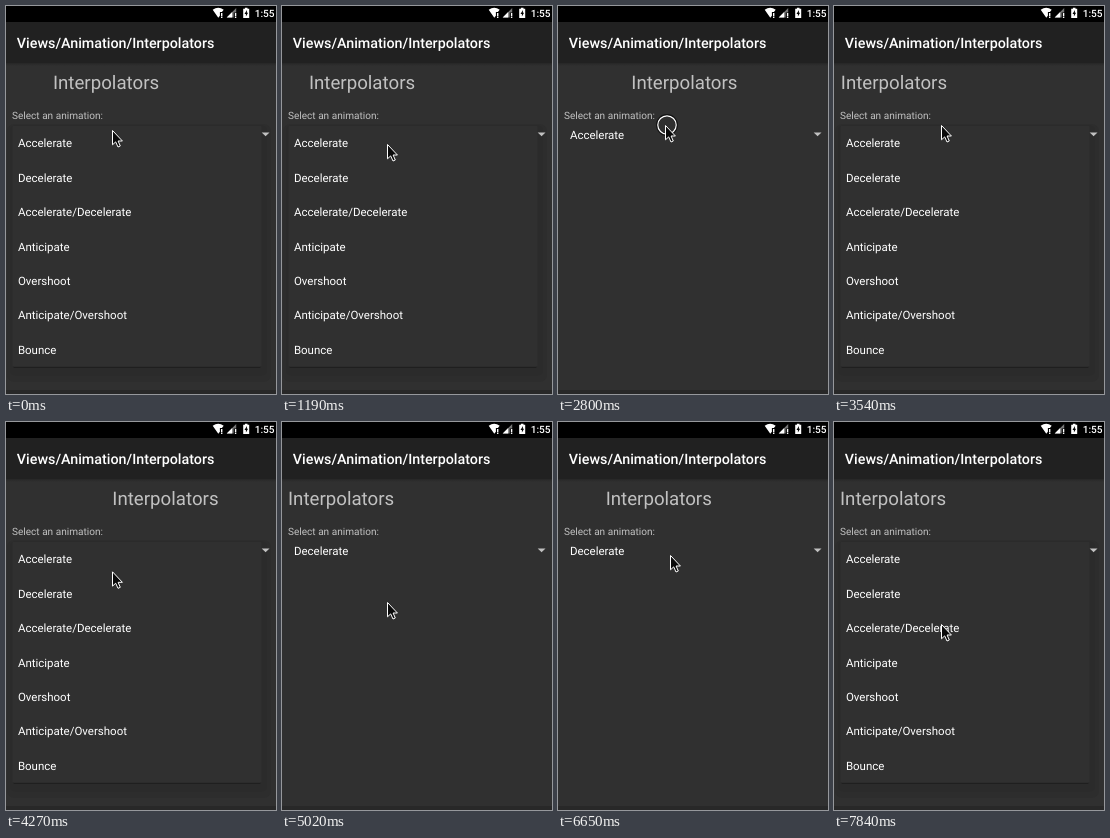
An HTML page for the animation above (7.99 s loop, 270 by 388 pixels).

```html
<!DOCTYPE html>
<html lang="en">
<head>
<meta charset="utf-8">
<title>Interpolators</title>
<style>
  html, body { margin: 0; width: 100%; height: 100%; overflow: hidden; background: #303030; }
  svg { display: block; width: 100%; height: 100%; }
  text { font-family: Roboto, "Noto Sans", sans-serif; fill: #fff; text-rendering: geometricPrecision; }
  .row { font-size: 11.5px; }
  .soft { fill: #c1c1c1; }
</style>
</head>
<body>
<svg viewBox="0 0 270 388">
  <defs>
    <linearGradient id="drop" x1="0" y1="0" x2="0" y2="1">
      <stop offset="0" stop-color="#000" stop-opacity=".2"/>
      <stop offset="1" stop-color="#000" stop-opacity="0"/>
    </linearGradient>
  </defs>

  <rect width="270" height="388" fill="#303030"/>
  <rect y="384" width="270" height="4" fill="#282828"/>
  <rect y="57" width="270" height="3" fill="url(#drop)"/>
  <rect y="15" width="270" height="42" fill="#212121"/>
  <rect width="270" height="16" fill="#000"/>

  <!-- status icons -->
  <g fill="#fff" transform="translate(-.3 -.5)">
    <path d="M207 4.2Q212.5 .2 218 4.2L216.2 6.6H214.2V10.2L212.6 12.2Z"/>
    <path d="M215.3 7.4h1.4v3h-1.4zM215.3 11h1.4v1.4h-1.4z"/>
    <path d="M230.5 2.5V7H228V12H221Z" fill="#777"/>
    <path d="M226.5 6.5V12H221Z"/>
    <path d="M229.2 7.6h1.4v2.8h-1.4zM229.2 11h1.4v1.4h-1.4z"/>
    <path d="M239.2 2.2h2.6v1.1h1.7v9.2h-6v-9.2h1.7z"/>
    <path d="M241.2 4.6L238.8 8.4H240.2V11L242.4 7.3H241.2Z" fill="#000"/>
  </g>
  <text x="248.7" y="11.1" font-size="10.1" font-weight="500">1:55</text>
  <text x="10.8" y="42" font-size="14.3" font-weight="500">Views/Animation/Interpolators</text>

  <text id="title" class="soft" x="6" y="83" font-size="18.7">Interpolators</text>
  <text class="soft" x="6" y="113.2" font-size="10.07">Select an animation:</text>
  <text id="choice" class="row" x="11.9" y="132.8"></text>

  <g id="menu">
    <rect x="1" y="118" width="264" height="258" rx="7" fill="#000" opacity=".07"/>
    <rect x="4" y="119" width="257" height="251" rx="5" fill="#000" opacity=".04"/>
    <rect x="7" y="121" width="248" height="241" rx="1.4" fill="#1f1f1f"/>
    <rect x="6.5" y="120" width="249" height="240.8" rx="1.4" fill="#303030"/>
  </g>
  <path class="soft" d="M255.7 126.4h7.8l-3.9 3.9z"/>

  <g id="pointer">
    <g id="ring" fill="none">
      <circle cx="2" cy="0" r="9.6" stroke="#111" stroke-width="2.6"/>
      <circle cx="2" cy="0" r="9.2" stroke="#fff" stroke-width="1.2"/>
    </g>
    <path d="M.5 .5V14.8L3.7 11.9L6 17L8.3 16L6.1 11H10.4Z" fill="#0a0a0a" stroke="#fff" stroke-linejoin="round"/>
  </g>
</svg>
<script>
const $ = id => document.getElementById(id);
const LOOP = 7990;
const TICK = 147.5;                 // the screen refreshes once per tick
const DELAY = 300, CYCLE = 1328, TRAVEL = 152;
const HEAD_START = 819;             // time already spent in the first run
const SWITCH = 33;                  // tick at which the second item is chosen
const clicks = [9, 19, 32, 47];     // ticks showing the click ring
const toggles = [11, 23, SWITCH, 48]; // ticks at which the menu closes or opens

const items = ["Accelerate", "Decelerate", "Accelerate/Decelerate", "Anticipate",
  "Overshoot", "Anticipate/Overshoot", "Bounce"];
items.forEach((name, i) => {
  const row = document.createElementNS("http://www.w3.org/2000/svg", "text");
  row.setAttribute("class", "row");
  row.setAttribute("x", 11.9);
  row.setAttribute("y", 141.3 + i * 34.42);
  row.textContent = name;
  $("menu").append(row);
});

const accelerate = p => p * p;
const decelerate = p => 1 - (1 - p) ** 2;
const clamp = v => Math.min(1, Math.max(0, v));

// Pointer moves: begin, end, x, y
const home = [106, 124];
const moves = [
  [300, 1040, 105, 138],
  [2220, 2660, 107, 119],
  [3840, 4720, 105, 180],
  [6350, 6630, 112, 133],
  [7300, 7810, 107, 202]
];
const pointerAt = t => moves.reduce(([x, y], [begin, end, nx, ny]) => {
  const k = clamp((t - begin) / (end - begin));
  return [x + (nx - x) * k, y + (ny - y) * k];
}, home);

const show = (id, on) => $(id).setAttribute("visibility", on ? "visible" : "hidden");
const move = (id, x, y) => $(id).setAttribute("transform", `translate(${x} ${y})`);

function draw(time) {
  const tick = Math.min(53, Math.floor((time + 10) / TICK));
  const t = tick * TICK;
  const late = tick >= SWITCH;
  const phase = (late ? t - SWITCH * TICK + 6 : t + HEAD_START) % CYCLE;
  const ease = late ? decelerate : accelerate;
  const open = toggles.filter(n => n <= tick).length % 2 === 0;

  move("title", TRAVEL * ease(clamp((phase - DELAY) / 1000)), 0);
  $("choice").textContent = items[late ? 1 : 0];
  show("menu", open);
  show("choice", !open);
  show("ring", clicks.includes(tick));
  move("pointer", ...pointerAt(t));
}

const origin = performance.now();
function loop() {
  draw((performance.now() - origin) % LOOP);
  requestAnimationFrame(loop);
}
loop();
</script>
</body>
</html>
```
